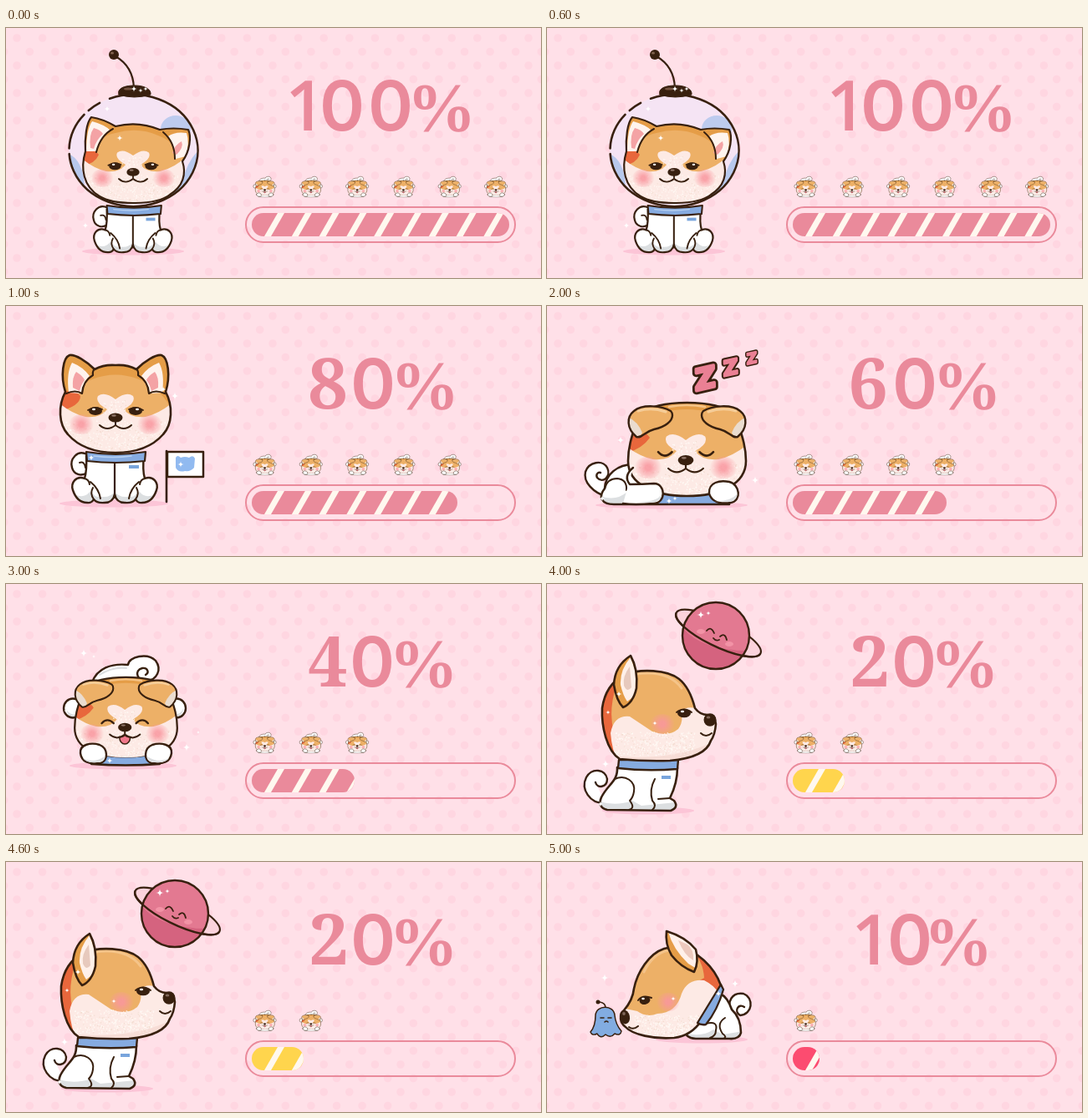
Animation, 640 px wide and 300 px high, one loop 6 s. Source, as an HTML page with a canvas:

```html
<!DOCTYPE html>
<html lang="en">
<head>
<meta charset="utf-8">
<title>Puppy progress</title>
<style>
html, body { margin: 0; width: 100%; height: 100%; overflow: hidden; background: #ffe0e8; }
canvas { display: block; width: 640px; height: 300px; }
</style>
</head>
<body>
<canvas id="stage"></canvas>
<script>
const canvas = document.getElementById('stage');
const c = canvas.getContext('2d');
const dpr = window.devicePixelRatio || 1;
canvas.width = 640 * dpr;
canvas.height = 300 * dpr;

const INK = '#38200f', ROSE = '#ea8a9b', ORANGE = '#edb067', AMBER = '#e59d47', RUST = '#e8673c';
const CREAM = '#fdeae5', BLUE = '#86abe0', GREY = '#dcdfe1', PINK = '#f4a3a5';

function shape(d, fill, width = 2.4, stroke = INK) {
  const p = new Path2D(d);
  if (fill) { c.fillStyle = fill; c.fill(p); }
  if (width) { c.lineWidth = width; c.strokeStyle = stroke; c.stroke(p); }
}
const line = (d, width = 2, color = INK) => shape(d, null, width, color);
const patch = (d, fill) => shape(d, fill, 0);

function oval(x, y, rx, ry, fill, width = 0, turn = 0) {
  c.beginPath();
  c.ellipse(x, y, rx, ry, turn, 0, 7);
  if (fill) { c.fillStyle = fill; c.fill(); }
  if (width) { c.lineWidth = width; c.strokeStyle = INK; c.stroke(); }
}

function at(x, y, s, draw, turn = 0) {
  c.save();
  c.translate(x, y);
  c.rotate(turn);
  c.scale(s, s);
  draw();
  c.restore();
}

function mirror(cx, draw) {
  draw();
  c.save();
  c.translate(2 * cx, 0);
  c.scale(-1, 1);
  draw();
  c.restore();
}

// Fill a path, paint details inside it, then outline it.
function filled(d, fill, details, width = 2.6) {
  patch(d, fill);
  c.save();
  c.clip(new Path2D(d));
  details();
  c.restore();
  if (width) line(d, width);
}

function grain(x, y, w, h, count) {
  let seed = 7;
  const rnd = () => (seed = seed * 16807 % 2147483647) / 2147483647;
  for (let i = 0; i < count; i++) {
    oval(x + rnd() * w, y + rnd() * h, 0.9, 0.6, i % 4 ? '#fffaf5' : '#f3ddd1', 0, rnd() * 3);
  }
}

function star(x, y, r) {
  c.fillStyle = '#fff';
  c.beginPath();
  c.moveTo(x, y - r);
  for (const [dx, dy] of [[1, 0], [0, 1], [-1, 0], [0, -1]]) {
    c.quadraticCurveTo(x, y, x + dx * r, y + dy * r);
  }
  c.fill();
}

function blush(x, y, r) {
  const g = c.createRadialGradient(x, y, r * 0.2, x, y, r);
  g.addColorStop(0, 'rgba(249,150,158,.85)');
  g.addColorStop(1, 'rgba(249,150,158,0)');
  oval(x, y, r, r * 0.8, g);
}

const shadow = (x, y, rx) => oval(x, y, rx, 4.5, '#fcc5d7');

// Left edge that puts the ink of a glyph around x.
function inkLeft(ch, x) {
  const m = c.measureText(ch);
  return x + (m.actualBoundingBoxLeft - m.actualBoundingBoxRight) / 2;
}

// Front-view face markings, measured from the nose.
function muzzle() {
  patch('M-80-28Q-58-5-36 0Q-18 2-10-9Q-25-17-21-25Q-13-31 0-21Q13-31 21-25Q25-17 10-9Q18 2 36 0Q58-5 80-28V65H-80Z', CREAM);
  grain(-60, 5, 120, 40, 420);
  grain(-14, -20, 28, 16, 40);
  blush(-41, 9, 15);
  blush(41, 9, 15);
}

function features(mood) {
  mirror(0, () => {
    if (mood === 'awake') {
      oval(-24, -7, 8, 5, INK);
      line('M-33-8Q-25-13-16-9', 1.8);
      oval(-26, -9, 2, 1.2, '#fff');
    } else {
      line(mood === 'sleep' ? 'M-30-8Q-23 0-15-8' : 'M-29-4Q-22-12-14-4', 2.4);
    }
  });
  if (mood === 'happy') shape('M-7 13Q-6 22 0 22Q6 22 7 13Q3 14 0 11Q-3 14-7 13Z', '#f0788b', 1.5);
  line('M0 4V10M-19 10Q-10 18 0 10Q10 18 19 10', 2);
  oval(0, 1, 8.5, 5.5, INK);
  oval(-2, -1.5, 2.8, 1.2, '#8d7467');
}

function sittingBody() {
  shape('M97 178C85 172 76 184 79 194C81 202 90 205 97 200', '#fff');
  line('M88 188Q94 186 95 194');
  filled('M96 180Q97 197 94 207C84 203 77 212 80 221Q85 236 97 236Q102 237 105 232Q109 237 118 236Q128 236 130 226Q132 236 142 236Q151 237 155 232Q158 237 163 236Q175 236 180 221C183 212 176 203 166 207Q163 197 165 180Z', '#fff', () => {
    mirror(130, () => patch('M78 223Q92 234 101 222Q107 231 115 229Q125 230 131 222V240H78Z', GREY));
  }, 2.4);
  mirror(130, () => line('M94 207Q99 208 100 214M101 211Q111 219 113 231M105 232Q100 225 104 218', 2));
  line('M130 188V230', 2.2);
  patch('M147 191H159V195H147Z', '#79a5dc');
  shape('M96 175Q131 181 167 175L166 186Q131 190 97 186Z', BLUE, 2.2);
  line('M105 180Q128 183 150 180', 1.5, '#b7d1f2');
}

function astronaut() {
  shadow(152, 268, 61);
  c.save();
  c.translate(104, 270);
  c.scale(.92, .92);
  c.translate(-78, -237);
  sittingBody();
  c.restore();
  line('M153 72Q152 46 131 34', 2.2);
  oval(129, 32, 6, 6, INK);
  oval(127, 30, 2, 1.5, '#80624e');
  c.save();
  c.beginPath();
  c.ellipse(152.5, 147, 77, 67, 0, 0, 7);
  c.fillStyle = '#f5e4f4';
  c.fill();
  c.clip();
  oval(203, 121, 18, 16, '#bdcbee');
  patch('M72 150Q92 156 94 190L125 216H72ZM232 145Q216 160 211 185L185 214H232Z', '#b7c8ec');
  filled('M131 118Q116 109 102 107C96 114 94 132 95 148C89 168 92 190 112 202C130 213 180 213 196 200C212 190 216 175 211 160C220 148 222 130 218 122Q200 119 184 122Q158 111 131 118Z', AMBER, () => {
    patch('M90 160Q108 130 131 126Q158 118 182 129Q206 138 215 165L200 215H95Z', ORANGE);
    patch('M90 142Q106 143 111 152Q106 164 90 165Z', RUST);
    at(152, 172, .9, muzzle);
    patch('M96 148Q96 122 103 112Q118 116 125 123Q113 131 108 148ZM215 154Q220 138 216 126Q202 124 194 130Q202 140 203 157Z', '#fff4ee');
    patch('M101 144Q99 128 105 120Q113 122 116 127Q108 134 105 145ZM199 150Q202 140 210 136Q213 143 204 152Z', PINK);
    line('M128 121Q113 129 108 149M188 125Q202 137 202 157', 2);
  }, 2.2);
  at(152, 172, .9, () => features('awake'));
  c.restore();
  c.lineWidth = 2.6;
  c.strokeStyle = INK;
  for (const [from, to] of [[-1.95, 3.08], [3.18, 3.84], [3.94, 4.16]]) {
    c.beginPath();
    c.ellipse(152.5, 147, 77, 67, 0, from, to);
    c.stroke();
  }
  shape('M135 80C132 71 145 69 154 69C165 69 174 73 173 80Q153 86 135 80Z', INK, 1);
  oval(146, 73, 5, 1.6, '#765542');
  star(153, 73, 4); star(161, 75, 3); star(167, 73, 3);
  star(136, 132, 4); star(121, 97, 4); star(95, 237, 4);
}

function standardBearer() {
  shadow(129, 237, 65);
  sittingBody();
  filled('M131 71Q117 70 106 76C96 66 83 58 76 59C68 62 65 84 71 103C62 120 63 142 74 154C88 170 109 176 131 176C153 176 174 170 188 154C199 142 200 120 191 103C197 84 194 62 186 59C179 58 166 66 156 76Q145 70 131 71Z', AMBER, () => {
    patch('M60 130Q78 96 103 88Q131 77 159 88Q184 96 202 130V180H60Z', ORANGE);
    patch('M60 106Q81 97 89 108Q89 121 60 127Z', RUST);
    at(131, 133, 1, muzzle);
    mirror(131, () => {
      patch('M75 104Q72 80 79 68Q92 73 100 84Q92 91 90 105Z', '#fff3ed');
      patch('M80 98Q79 85 84 79Q92 84 94 89Q90 94 88 102Z', PINK);
      line('M107 75Q103 77 104 83Q92 90 91 105Q83 100 72 105', 2.2);
    });
  });
  at(131, 133, 1, () => features('awake'));
  shape('M193 175H236V205H193Z', '#fff', 2.5);
  line('M192 174V235', 2.6);
  patch('M203 182Q205 178 209 182Q214 180 219 182Q224 178 226 183L225 194Q221 199 214 198Q206 200 203 194Z', '#91baf0');
  star(209, 190, 4); star(202, 108, 5); star(188, 100, 4); star(102, 182, 4);
}

function floppyHead(mood) {
  filled('M167.5 116C142 116 122 121 110 130C104 150 97 165 97 186C97 214 128 228 167.5 228C207 228 238 214 238 186C238 165 231 150 225 130C213 121 193 116 167.5 116Z', ORANGE, () => {
    patch('M108 140Q166 108 228 140V110H108Z', AMBER);
    patch('M96 145Q118 149 123 158Q114 171 96 176Z', RUST);
    at(166, 184, 1.1, muzzle);
    line('M146 121Q167 117 189 121', 2.5, '#f5c488');
  });
  mirror(167.5, () => {
    filled('M148 126C138 120 115 117 104 126C95 133 95 147 107 157C114 159 116 151 128 148C142 145 150 138 150 131Q150 128 148 126Z', ORANGE, () => {
      patch('M94 132Q108 137 114 152L108 162H94Z', '#eadccf');
      line('M109 126Q125 121 142 127', 3, '#f6cd98');
    }, 2.4);
  });
  at(166, 184, 1.1, () => features(mood));
}

function snore(x, y, size) {
  at(x, y, 1, () => {
    c.font = `italic bold ${size}px "DejaVu Sans", sans-serif`;
    const left = inkLeft('Z', 0), base = size * .36;
    for (const [width, color] of [[.26, INK], [.1, '#ea8094']]) {
      c.lineWidth = size * width;
      c.strokeStyle = color;
      c.strokeText('Z', left, base);
    }
    c.fillStyle = '#ea8094';
    c.fillText('Z', left, base);
  }, -.22);
}

function sleeper() {
  shadow(149, 239, 91);
  shape('M72 229C55 224 43 211 46 199C50 187 66 184 72 194C77 204 67 214 60 206C58 202 61 199 64 200', '#fff');
  filled('M104 190C84 190 70 202 69 219C61 229 65 238 80 238H218V215Z', '#fff', () => {
    patch('M64 228Q82 235 96 223L100 240H64Z', GREY);
    patch('M125 226H216V240H125Z', BLUE);
  });
  line('M69 219Q72 207 84 207Q96 208 95 221', 2);
  floppyHead('sleep');
  shape('M103 194Q91 204 99 214Q114 214 128 213C142 213 143 237 127 237Q104 239 91 237', '#fff');
  shape('M194 225C193 211 207 209 218 211C231 214 233 234 220 236Q198 239 194 225Z', '#fff');
  patch('M110 235Q132 235 137 226Q136 235 125 236ZM199 234Q220 235 228 225Q226 233 219 235Z', GREY);
  snore(189, 86.5, 35);
  snore(219.5, 73.5, 25);
  snore(245, 62.5, 18);
  star(88, 161, 5); star(249, 209, 5); star(146, 234, 4); star(153, 231, 3); star(66, 231, 4);
}

function puppy(suit) {
  shape('M103 118C109 101 126 95 146 97C147 87 169 82 179 92C187 103 180 115 169 116C156 117 153 103 163 101C169 100 172 106 167 109', '#fff');
  line('M112 109Q127 99 144 101', 2, GREY);
  mirror(142, () => {
    oval(80, 149, 11, 11.5, '#fff', 2.4);
    patch('M72 149Q75 158 86 157L82 159Q72 159 72 149Z', GREY);
  });
  shape('M96 196L102 216Q143 219 184 216L190 196Z', suit, 2.4);
  c.save();
  c.translate(143.5, 171);
  c.scale(.87, .87);
  c.translate(-167.5, -184);
  floppyHead('happy');
  c.restore();
  patch('M120 207Q143 210 166 207V215Q143 217 120 215Z', suit);
  mirror(143.5, () => {
    shape('M89 203C88 192 102 190 112 193C122 197 123 212 113 215Q91 218 89 203Z', '#fff');
    patch('M92 209Q104 216 118 207Q116 215 108 214Q96 215 92 209Z', GREY);
  });
}

function greeter() {
  shadow(140, 218, 64);
  puppy(BLUE);
  star(93, 83, 5); star(216, 196, 5); star(124, 212, 4); star(105, 87, 2); star(230, 178, 2); star(72, 152, 3);
}

function planet() {
  at(205, 59, 1, () => oval(0, 0, 56, 16, '#fbd3dc', 2.2), .45);
  c.save();
  c.beginPath();
  c.arc(202, 62, 40, 0, 7);
  c.fillStyle = '#e37991';
  c.fill();
  c.clip();
  patch('M158 47Q180 81 246 80V110H158Z', '#d5637f');
  c.restore();
  oval(202, 62, 40, 40, null, 2.4);
  c.beginPath();
  c.ellipse(205, 59, 56, 16, .45, .05, 3.1);
  c.lineWidth = 2.4;
  c.stroke();
  line('M191 56Q196 50 200 59M207 63Q213 58 215 67M199 65Q202 69 206 67', 1.8);
  oval(184, 57, 5, 3, '#f293a6');
  oval(218, 72, 5, 3, '#f293a6');
  star(184, 37, 5); star(193, 35, 3);
}

function stargazer() {
  shadow(121, 272, 55);
  shape('M70 263C51 264 40 246 47 232C54 220 70 222 72 234C72 244 60 246 58 238', '#fff');
  filled('M84 220C85 237 73 240 65 256Q60 268 72 271L148 272Q158 268 152 260L147 257Q156 239 156 220Z', '#fff', () => {
    patch('M62 261Q83 267 102 260L113 266L155 262V275H62Z', GREY);
  });
  line('M81 234C94 228 106 237 104 249Q103 256 99 260Q106 269 98 271M129 234Q122 247 126 260Q132 266 126 271M147 257L133 258', 2);
  patch('M137 230H148V234H137Z', '#79a5dc');
  shape('M86 211H157L156 222Q119 225 85 221Z', BLUE, 2.4);
  filled('M92 109C112 101 144 103 158 114C169 123 174 137 177 149Q183 157 192 157Q202 159 202 168Q201 181 196 188C191 204 170 210 147 212Q116 213 87 210C71 200 65 170 66 149Q70 121 92 109Z', ORANGE, () => {
    patch('M62 120L83 121Q73 153 80 177L88 215H62Z', RUST);
    patch('M76 179Q80 157 99 159Q114 169 126 177Q145 184 157 174Q164 164 160 154Q166 146 178 149L210 151V217H87Q78 203 76 179Z', CREAM);
    grain(82, 178, 95, 28, 380);
    blush(138, 168, 15);
    patch('M86 207Q152 212 200 189V218H86Z', 'rgba(234,196,187,.35)');
    line('M107 108Q145 103 161 125', 3, '#f5c489');
  });
  filled('M100 86Q81 98 80 121Q83 140 91 148Q103 143 107 125Q109 102 100 86Z', AMBER, () => {
    patch('M100 88Q87 103 88 121Q91 134 96 141Q112 131 107 108Z', '#fff0e9');
    patch('M99 99Q90 111 92 122Q96 131 101 124Z', '#e7c9bd');
  });
  oval(164, 155, 8, 5.2, INK);
  line('M155 154Q164 147 173 154', 2);
  oval(162, 153, 2.2, 1.3, '#fff');
  oval(195, 163, 7.5, 7.8, INK);
  oval(193, 160, 2.4, 1.5, '#80675b');
  line('M184 179Q190 185 197 179', 2);
  star(70, 216, 5); star(64, 264, 4); star(86, 132, 4); star(129, 167, 3); star(73, 154, 3);
  planet();
}

function explorer() {
  shadow(185, 213, 55);
  shape('M221 181C214 167 222 156 235 158C248 163 246 183 231 184C223 179 229 169 236 174', '#fff');
  filled('M207 158Q216 162 221 177Q232 187 232 205Q230 213 218 212H178Q164 211 166 201Q169 193 180 193Z', '#fff', () => {
    patch('M164 205Q185 211 199 201L210 207L235 203V215H164Z', GREY);
  });
  line('M190 194Q205 190 202 202Q202 209 195 211M213 187Q202 194 210 206Q216 210 211 212', 2);
  filled('M140 104C122 110 108 132 104 152C103 162 98 171 92 178C86 184 87 193 94 198C102 207 128 213 152 211C168 209 179 199 185 190L208 148C200 125 178 106 160 103Q150 101 140 104Z', ORANGE, () => {
    patch('M172 104Q187 119 188 139L177 145L205 158L218 130Z', RUST);
    patch('M84 174L108 179Q119 187 132 182Q155 181 161 158Q168 140 188 142Q200 148 205 157L187 216H84Z', CREAM);
    grain(105, 184, 80, 25, 380);
    blush(145, 168, 14);
    line('M116 132Q126 110 145 106', 3, '#f4c38a');
  });
  shape('M208 147L180 193Q184 196 190 195Q204 178 211 153Z', BLUE, 2.3);
  filled('M143 83Q141 98 149 112Q160 126 176 132Q182 120 178 105Q166 90 143 83Z', AMBER, () => {
    patch('M145 84Q151 105 169 122L179 128L184 103Z', '#fff0e9');
    patch('M157 94Q164 112 175 118Q176 105 168 99Z', '#edc9bd');
  });
  oval(117, 166, 6.5, 5, INK, 0, -.25);
  line('M109 166Q114 159 125 163', 2);
  oval(115, 164, 1.8, 1.2, '#fff');
  oval(93, 186, 6, 8.5, INK, 0, -.2);
  oval(92, 182, 1.8, 2, '#80675b');
  line('M98 198Q103 202 109 197', 2);
  line('M70 175Q70 169 63 168', 1.7);
  oval(61, 168, 2.5, 2.5, INK);
  shape('M58 184C59 171 80 171 81 184Q82 195 89 203Q88 209 81 206Q76 212 70 207Q64 213 60 206Q54 209 52 204Q58 197 58 184Z', '#82ace1', 1.5);
  line('M64 187H68M73 187H77M69 192Q71 190 73 192', 1.6);
  star(69, 139, 5); star(225, 146, 5); star(205, 158, 4); star(151, 164, 3);
}

function backdrop() {
  c.fillStyle = '#ffe0e8';
  c.fillRect(0, 0, 640, 300);
  for (let row = 0; row < 19; row++) {
    for (let x = 13 + (row % 2) * 15.3 - 30.6; x < 650; x += 30.6) {
      oval(x, 12 + row * 16.5, 4.8, 4.8, '#ffd6e1');
    }
  }
}

function bar(end, color) {
  c.beginPath();
  c.roundRect(287, 215, 322, 42, 21);
  c.lineWidth = 2;
  c.strokeStyle = ROSE;
  c.stroke();
  c.save();
  c.beginPath();
  c.roundRect(294, 222, end - 294, 28, 14);
  c.fillStyle = color;
  c.fill();
  c.clip();
  for (let i = 0; i < 9; i++) {
    patch(`M${309 + i * 32.8} 250l16 -28h8l-16 28Z`, '#fff8ef');
  }
  c.restore();
}

function icons(count) {
  for (let i = 0; i < count; i++) {
    at(309.5 + i * 55.3, 190.5, .187, () => {
      c.translate(-142, -152);
      puppy('#fff');
    });
  }
}

function digitFont(ch) {
  switch (ch) {
    case '0': return '600 82px Inter, sans-serif';
    case '1': return '600 84px "Open Sans", sans-serif';
    case '%': return 'bold 83px "Liberation Serif", serif';
    default: return 'bold 84px "Noto Serif", serif';
  }
}

function label(text, centers) {
  c.fillStyle = ROSE;
  [...text].forEach((ch, i) => {
    c.font = digitFont(ch);
    c.fillText(ch, inkLeft(ch, centers[i]), 123);
  });
}

const scenes = [
  { draw: astronaut, text: '100%', centers: [353, 402, 460, 521.5], end: 602, icons: 6 },
  { draw: standardBearer, text: '80%', centers: [385, 439, 501.5], end: 540, icons: 5 },
  { draw: sleeper, text: '60%', centers: [384.5, 440, 503], end: 478, icons: 4 },
  { draw: greeter, text: '40%', centers: [385, 438, 500], end: 417, icons: 3 },
  { draw: stargazer, text: '20%', centers: [386, 439, 500], end: 356, icons: 2, color: '#ffd54d' },
  { draw: explorer, text: '10%', centers: [383, 434, 492.5], end: 326, icons: 1, color: '#fc4c70' }
];

let shown = -1;
function tick() {
  const index = Math.floor(performance.now() / 1000) % scenes.length;
  if (index !== shown) {
    shown = index;
    const s = scenes[index];
    c.setTransform(dpr, 0, 0, dpr, 0, 0);
    c.lineCap = c.lineJoin = 'round';
    backdrop();
    s.draw();
    label(s.text, s.centers);
    icons(s.icons);
    bar(s.end, s.color || ROSE);
  }
  requestAnimationFrame(tick);
}
tick();
</script>
</body>
</html>
```
